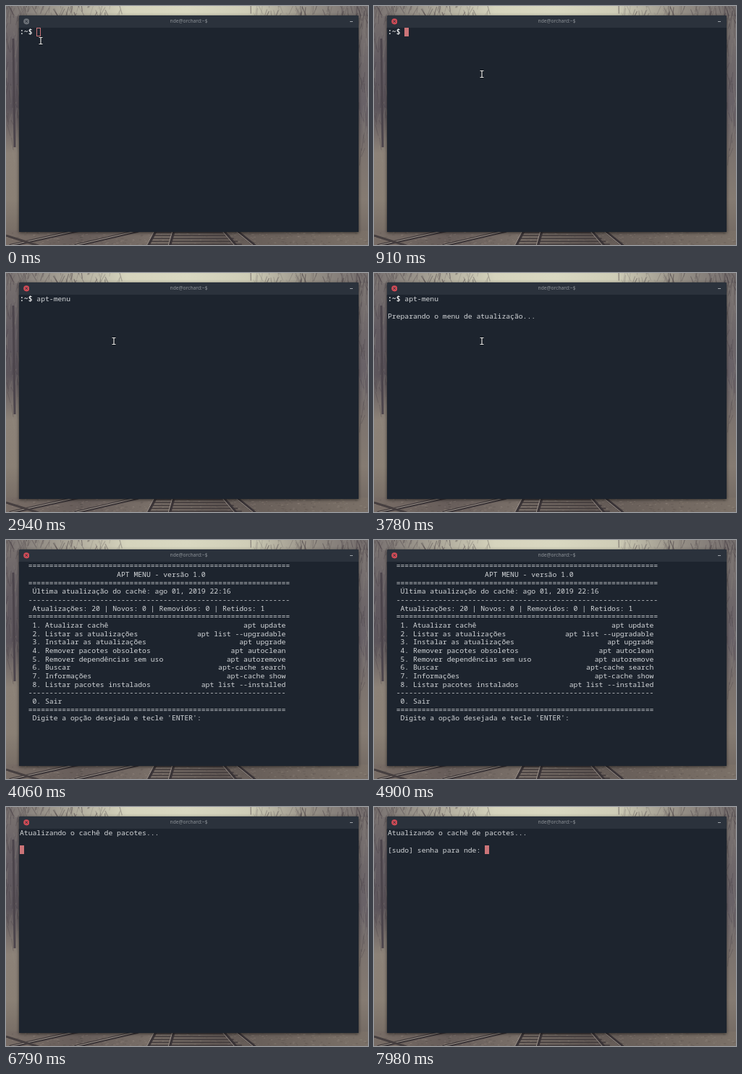
Animation of 500 by 330 pixels, one loop 8 s. Source, as an HTML page with a canvas:

```html
<!DOCTYPE html>
<html lang="pt">
<head>
<meta charset="utf-8">
<style>
html, body { margin: 0; width: 500px; height: 330px; overflow: hidden; background: #777068; }
canvas, .win, .bar, pre, #cursor, #mouse, #close, .min { position: absolute; }
canvas { left: 0; top: 0; }
.win { left: 18px; top: 13px; width: 469px; height: 298.5px; background: #1d242e; border-radius: 2px 2px 0 0; box-shadow: 0 1px 4px #0009; }
.bar { left: 0; top: 0; width: 100%; height: 16.5px; background: #2b323c; border-radius: 2px 2px 0 0;
  font: 6.7px/16px "Noto Sans", sans-serif; color: #8d9298; text-align: center; }
#close { left: 5.7px; top: 4.2px; }
.min { left: 457px; top: 8px; width: 4px; height: 1px; background: #a0a5aa; }
pre { margin: 0; left: 1px; top: 17.3px; font: 9.72px/11.67px "Noto Sans Mono", monospace; color: #d3d6d9; }
b { color: #e6e7e8; }
#cursor { width: 6px; height: 12px; box-sizing: border-box; border: 1px solid #cb7478; }
#mouse { left: -4px; top: -6px; }
</style>
</head>
<body>
<canvas id="scene" width="500" height="330"></canvas>
<div class="win">
  <div class="bar">nde@orchard:~$
    <svg id="close" width="8.6" height="8.6" viewBox="-4.3 -4.3 8.6 8.6">
      <circle id="disc" r="4.1"/><path d="M-1.5-1.5l3 3m0-3l-3 3" stroke="#2b323c"/>
    </svg>
    <div class="min"></div>
  </div>
  <div id="cursor"></div>
  <pre><b id="prompt"></b><span id="text"></span></pre>
</div>
<svg id="mouse" width="8" height="12" viewBox="-4 -6 8 12" fill="none">
  <path d="M-2.5-4.5H2.5M0-4.5V4.5M-2.5 4.5H2.5" stroke="#10151b" stroke-width="3"/>
  <path d="M-2.5-4.5H2.5M0-4.5V4.5M-2.5 4.5H2.5" stroke="#e8e8e8" stroke-width="1.2"/>
</svg>
<script>
const $ = id => document.getElementById(id);
const LOOP = 8000, CELL = 5.832, ROW = 11.67, BLINK = 600, FOCUS = 520;

function drawScene() {
  const c = $('scene').getContext('2d');
  let seed = 7;
  const rnd = () => (seed = seed * 16807 % 2147483647) / 2147483647;
  const fill = (x, y, w, h, x1, y1, stops) => {
    const g = c.createLinearGradient(x, y, x1, y1);
    stops.forEach((s, i) => g.addColorStop(i / (stops.length - 1), s));
    c.fillStyle = g;
    c.fillRect(x, y, w, h);
  };
  const line = (color, width, ...p) => {
    c.strokeStyle = color;
    c.lineWidth = width;
    c.beginPath();
    for (let i = 0; i < p.length; i += 2) c.lineTo(p[i], p[i + 1]);
    c.stroke();
  };
  fill(0, 0, 500, 330, 500, 0, ['#77706f', '#a9a497', '#d6d4bd', '#d9d8c1', '#cfcdb7', '#999389', '#736c6c']);
  fill(0, 14, 18, 316, 0, 330, ['#77706f', '#625b61', '#5c555b', '#8c8278', '#8a8075', '#716760']);
  fill(487, 14, 13, 316, 487, 330, ['#7d7673', '#6f686a', '#686167', '#7c736e', '#857b72', '#6f6660']);
  fill(0, 310, 500, 20, 500, 310, ['#786d66', '#675d5a', '#796f68', '#625955', '#70665f', '#7b7168']);

  // bare branches along the top and both sides
  for (let i = 0; i < 150; i++) {
    const side = i % 2, d = rnd() ** 1.7 * 165, x = side ? 500 - d : d;
    const y = rnd() * 24, lean = (rnd() - .5) * 18;
    line(`rgba(65,56,62,${.15 + rnd() * .35})`, .5 + rnd() * .8, x, y, x + lean, y - 14);
  }
  for (let i = 0; i < 90; i++) {
    const x = i % 2 ? 487 + rnd() * 13 : rnd() * 18, y = rnd() * 200;
    line(`rgba(${rnd() < .6 ? '55,47,55' : '150,143,132'},.35)`, .7, x, y, x + (rnd() - .5) * 10, y + 8 + rnd() * 18);
  }
  line('#4c454c', 3, 10, 45, 12, 195);
  for (let i = 0; i < 300; i++) {
    c.fillStyle = rnd() < .5 ? '#4a413f40' : '#b0a59640';
    c.fillRect(rnd() * 500, 312 + rnd() * 18, 1 + rnd() * 3, 1);
  }

  // rails and sleepers
  for (let y = 313; y < 330; y += 4) line('#403a3b', 1.6, 207 - (y - 312) * .5, y, 302 + (y - 312) * 1.4, y);
  for (const [x0, x1] of [[100, 5], [185, 95], [207, 196], [232, 226], [300, 318], [318, 344]]) {
    line('#3a3437', 4, x0, 310, x1, 331);
    line('#a1978e', 1, x0 - 2, 310, x1 - 2, 331);
  }
  line('#463f40', 3, 0, 317, 45, 331);
}

const rule = (ch, n) => '  ' + ch.repeat(n);
const options = [
  ['Atualizar cachê', 'apt update'],
  ['Listar as atualizações', 'apt list --upgradable'],
  ['Instalar as atualizações', 'apt upgrade'],
  ['Remover pacotes obsoletos', 'apt autoclean'],
  ['Remover dependências sem uso', 'apt autoremove'],
  ['Buscar', 'apt-cache search'],
  ['Informações', 'apt-cache show'],
  ['Listar pacotes instalados', 'apt list --installed']
];
const menu = [
  rule('=', 62),
  ' '.repeat(23) + 'APT MENU - versão 1.0',
  rule('=', 62),
  '   Última atualização do cachê: ago 01, 2019 22:16',
  rule('-', 62),
  '   Atualizações: 20 | Novos: 0 | Removidos: 0 | Retidos: 1',
  rule('=', 62),
  ...options.map(([name, cmd], i) => {
    const left = `   ${i + 1}. ${name}`;
    return left + cmd.padStart(63 - left.length);
  }),
  rule('-', 61),
  '   0. Sair',
  rule('=', 61),
  "   Digite a opção desejada e tecle 'ENTER': "
].join('\n');

const PROMPT = ':~$ ', MENU_AT = 4060;
const update = 'Atualizando o cachê de pacotes...\n\n';
// [time, screen text]
const screens = [
  [0, PROMPT],
  [1750, PROMPT + 'a'], [1820, PROMPT + 'ap'], [1960, PROMPT + 'apt'],
  [2030, PROMPT + 'apt-'], [2100, PROMPT + 'apt-m'], [2240, PROMPT + 'apt-menu '],
  [3060, PROMPT + 'apt-menu \n\nPreparando o menu de atualização...\n'],
  [MENU_AT, menu],
  [6300, menu + '1'],
  [6790, update],
  [6860, update + '[sudo] senha para nde: ']
];
// key presses restart the blink
const keys = [FOCUS, 1750, 1820, 1960, 2030, 2100, 2240, 3060, 6300, 6640];

function render(t) {
  const text = screens.findLast(s => s[0] <= t)[1];
  const hasPrompt = text.startsWith(PROMPT);
  $('prompt').textContent = hasPrompt ? PROMPT : '';
  $('text').textContent = hasPrompt ? text.slice(PROMPT.length) : text;

  const focused = t >= FOCUS, lines = text.split('\n');
  const lastKey = keys.findLast(k => k <= t) ?? 0;
  const cur = $('cursor').style;
  cur.left = 1 + lines.at(-1).length * CELL + 'px';
  cur.top = 17 + (lines.length - 1) * ROW + 'px';
  cur.background = focused ? '#cb7478' : 'none';
  cur.visibility = focused && Math.floor((t - lastKey) / BLINK) % 2 ? 'hidden' : 'visible';
  $('disc').setAttribute('fill', focused ? '#cf4b56' : '#6b7077');

  const p = Math.min(1, Math.max(0, (t - 70) / 490)), e = p * p * (3 - 2 * p);
  $('mouse').style.transform = `translate(${48 + 101 * e}px, ${48 + 46 * e}px)`;
  $('mouse').style.visibility = t < MENU_AT ? 'visible' : 'hidden';
}

drawScene();
const start = performance.now();
function tick() {
  render((performance.now() - start) % LOOP);
  requestAnimationFrame(tick);
}
tick();
</script>
</body>
</html>
```
